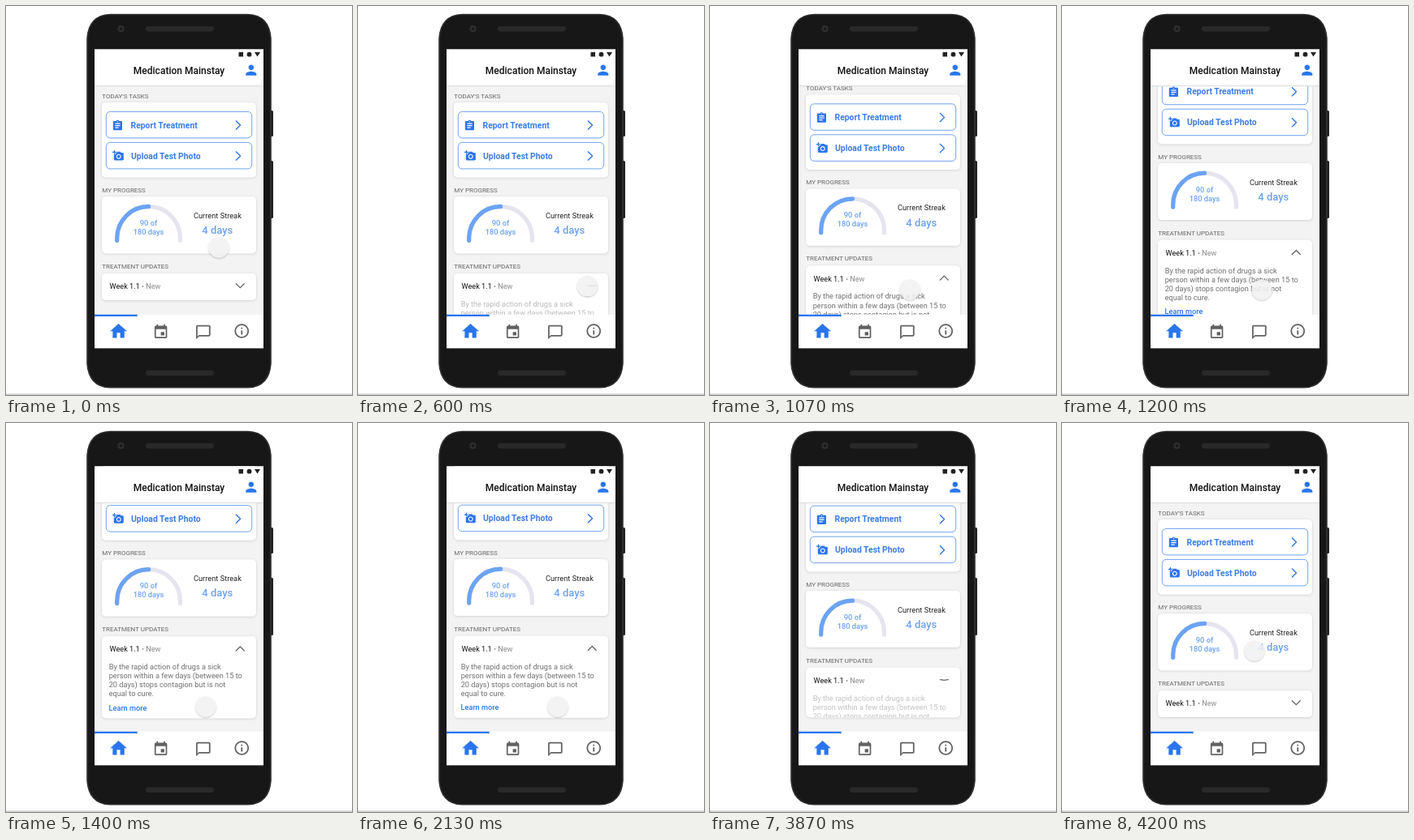
These frames come from a looping animation (426 px wide and 480 px high, 5790 ms). An HTML page:

```html
<!DOCTYPE html>
<html lang="en">
<head>
<meta charset="utf-8">
<style>
html, body { margin: 0; width: 100%; height: 100%; overflow: hidden; background: #fff; }
svg { display: block; width: 100%; height: 100%; font-family: Roboto, sans-serif; }
.label { font-size: 8px; fill: #666; }
.card { fill: #fff; filter: url(#shadow); }
.button { fill: #fff; stroke: #5f97ea; stroke-width: .9; }
.action { font-size: 10.4px; font-weight: 700; fill: #3b7de6; }
.blue { fill: #2a75ee; }
.soft { fill: #6ca3f2; font-weight: 500; }
.gray { fill: #616161; }
.copy { font-size: 9.2px; fill: #707070; }
.line { fill: none; stroke-linecap: round; }
.chevron { fill: none; stroke: #2f76e6; stroke-width: 1.4; }
</style>
</head>
<body>
<svg viewBox="0 0 426 480">
  <defs>
    <filter id="shadow" x="-10%" y="-20%" width="120%" height="150%">
      <feDropShadow dx="0" dy=".6" stdDeviation="1.6" flood-opacity=".17"/>
    </filter>
    <filter id="lift" x="-40%" y="-40%" width="180%" height="180%">
      <feDropShadow dx="0" dy="1" stdDeviation="1" flood-opacity=".3"/>
    </filter>
    <clipPath id="screen"><rect x="109" y="53.600" width="208" height="368.600"/></clipPath>
    <clipPath id="cardClip"><rect id="copyArea" x="118" y="330" width="190" height="33"/></clipPath>
  </defs>

  <rect width="426" height="480" fill="#fff"/>
  <rect y="478.500" width="426" height="1.500" fill="#c9c9c9"/>

  <!-- Phone body -->
  <rect x="324" y="129" width="5" height="32" rx="1.500" fill="#222"/>
  <rect x="324" y="191" width="5" height="71" rx="1.500" fill="#222"/>
  <path d="M128 9.800H298Q324.800 11 326.800 40V441Q324.800 470.600 298 471.600H128Q101.200 470.600 99.200 441V40Q101.200 11 128 9.800Z" fill="#2e2e2e"/>
  <path d="M128 11.300H298Q323 12 325 40V441Q323 469 298 470.100H128Q103 469 101 441V40Q103 12 128 11.300Z" fill="#171717"/>
  <circle cx="141.500" cy="28" r="4" fill="#303030"/>
  <circle cx="141.500" cy="28" r="2" fill="#1b1b1b"/>
  <rect x="172" y="25" width="84" height="6.500" rx="3.200" fill="#292929"/>
  <rect x="172" y="449.500" width="84" height="6.500" rx="3.200" fill="#292929"/>

  <g clip-path="url(#screen)">
    <rect x="109" y="53" width="208" height="370" fill="#f3f3f3"/>

    <g id="page">
      <text class="label" x="118.300" y="113.600">TODAY'S TASKS</text>
      <rect class="card" x="118" y="119" width="190" height="92.500" rx="5"/>
      <rect class="button" x="123.300" y="130.400" width="179.400" height="32.500" rx="5"/>
      <rect class="button" x="123.300" y="168.400" width="179.400" height="32.500" rx="5"/>
      <text class="action" x="153.500" y="150.500">Report Treatment</text>
      <text class="action" x="154" y="188.500">Upload Test Photo</text>
      <path class="chevron" d="M283 141.500l5.500 5.500-5.500 5.500M283 179.500l5.500 5.500-5.500 5.500"/>
      <path class="blue" transform="translate(130 140.200) scale(.62)" d="M19 3h-4.180C14.400 1.840 13.300 1 12 1c-1.300 0-2.400.84-2.820 2H5c-1.100 0-2 .9-2 2v14c0 1.100.9 2 2 2h14c1.100 0 2-.9 2-2V5c0-1.100-.9-2-2-2zm-7 0c.55 0 1 .45 1 1s-.45 1-1 1-1-.45-1-1 .45-1 1-1zm2 14H7v-2h7v2zm3-4H7v-2h10v2zm0-4H7V7h10v2z"/>
      <path class="blue" transform="translate(131 177.300) scale(.6)" d="M3 4V1h2v3h3v2H5v3H3V6H0V4h3zm3 6V7h3V4h7l1.830 2H21c1.100 0 2 .9 2 2v12c0 1.100-.9 2-2 2H5c-1.100 0-2-.9-2-2V10h3zm7 9c2.760 0 5-2.240 5-5s-2.240-5-5-5-5 2.240-5 5 2.240 5 5 5zm-3.200-5c0 1.770 1.430 3.200 3.200 3.200s3.200-1.430 3.200-3.200-1.430-3.200-3.200-3.200-3.200 1.430-3.200 3.200z"/>

      <text class="label" x="118.300" y="230">MY PROGRESS</text>
      <rect class="card" x="118" y="235.300" width="190" height="70" rx="5"/>
      <g class="line" stroke-width="5.200">
        <path stroke="#e5e4ef" d="M136.700 289.300V286.300a38.900 38.900 0 0 1 77.800 0v3"/>
        <path stroke="#6ca3f2" d="M136.700 289.300V286.300a38.900 38.900 0 0 1 38.900-38.900"/>
      </g>
      <g class="soft" font-size="9.300" text-anchor="middle">
        <text x="175.500" y="271">90 of</text>
        <text x="175.500" y="282">180 days</text>
      </g>
      <text x="231" y="262" font-size="9.250" fill="#222">Current Streak</text>
      <text class="soft" x="241.300" y="281.100" font-size="13">4 days</text>

      <text class="label" x="118.300" y="324">TREATMENT UPDATES</text>
      <rect id="updates" class="card" x="118" y="330" width="190" height="33" rx="5"/>
      <text x="127.600" y="349.200" font-size="9.100" fill="#111">Week 1.1 <tspan fill="#8a8a8a">• New</tspan></text>
      <path id="toggle" class="line" stroke="#666" stroke-width="1.300"/>
      <g clip-path="url(#cardClip)">
        <g id="copy" class="copy">
          <text x="126.700" y="371">By the rapid action of drugs a sick</text>
          <text x="126.700" y="382.100">person within a few days (between 15 to</text>
          <text x="126.700" y="393.200">20 days) stops contagion but is not</text>
          <text x="126.700" y="404.200">equal to cure.</text>
          <text class="blue" x="126.500" y="421.600" font-weight="500">Learn more</text>
        </g>
      </g>
    </g>

    <!-- Header -->
    <rect x="109" y="98" width="208" height="1.200" fill="#dedede"/>
    <rect x="109" y="53" width="208" height="45" fill="#fff"/>
    <g fill="#222">
      <rect x="286.500" y="57" width="5.500" height="5.500"/>
      <circle cx="299.500" cy="59.700" r="2.900"/>
      <path d="M306 57h7l-3.500 5.500z"/>
    </g>
    <text x="213" y="84" font-size="12" font-weight="500" text-anchor="middle" fill="#111">Medication Mainstay</text>
    <path class="blue" transform="translate(292 69.300) scale(.82)" d="M12 12c2.210 0 4-1.790 4-4s-1.790-4-4-4-4 1.790-4 4 1.790 4 4 4zm0 2c-2.670 0-8 1.340-8 4v2h16v-2c0-2.660-5.330-4-8-4z"/>

    <!-- Tab bar -->
    <rect x="109" y="380.800" width="208" height="42" fill="#fff"/>
    <rect class="blue" x="109" y="380.700" width="52.700" height="2.300"/>
    <path class="blue" transform="translate(126.200 388.900) scale(1.030)" d="M10 20v-6h4v6h5v-8h3L12 3 2 12h3v8z"/>
    <path class="gray" transform="translate(180.300 391.900) scale(.86)" d="M17 12h-5v5h5v-5zM16 1v2H8V1H6v2H5c-1.110 0-2 .9-2 2v14c0 1.100.89 2 2 2h14c1.100 0 2-.9 2-2V5c0-1.100-.9-2-2-2h-1V1h-2zm3 18H5V8h14v11z"/>
    <path class="gray" transform="translate(232.300 392) scale(.88)" d="M20 2H4c-1.100 0-2 .9-2 2v18l4-4h14c1.100 0 2-.9 2-2V4c0-1.100-.9-2-2-2zm0 14H6l-2 2V4h16v12z"/>
    <path class="gray" transform="translate(279.700 390.500) scale(.88)" d="M11 7h2v2h-2zm0 4h2v6h-2zm1-9C6.480 2 2 6.480 2 12s4.480 10 10 10 10-4.480 10-10S17.520 2 12 2zm0 18c-4.410 0-8-3.590-8-8s3.590-8 8-8 8 3.590 8 8-3.590 8-8 8z"/>

    <g id="pointer"><circle r="12.500" fill="#f2f2f2" filter="url(#lift)"/></g>
  </g>
</svg>
<script>
const LOOP = 5790, SCROLL = 67.2, CARD_GROWTH = 68;
const [page, updates, copyArea, copy, toggle, pointer] =
  ['page', 'updates', 'copyArea', 'copy', 'toggle', 'pointer'].map(id => document.getElementById(id));

const progress = (t, start, end) => Math.min(1, Math.max(0, (t - start) / (end - start)));
const easeOut = p => Math.sin(p * Math.PI / 2);
const easeInOut = p => p * p * (3 - 2 * p);
const mix = (a, b, p) => a + (b - a) * p;

// Each move: start, end, destination x and y
const moves = [
  [0, 330, 287, 345],
  [530, 870, 246, 350],
  [2700, 3200, 242, 292],
  [3600, 4130, 237, 281]
];

function pointerAt(t) {
  let x = 262, y = 298;
  for (const [start, end, toX, toY] of moves) {
    const p = easeInOut(progress(t, start, end));
    x = mix(x, toX, p);
    y = mix(y, toY, p);
  }
  return [x, y];
}

function render(t) {
  const closing = easeInOut(progress(t, 3550, 4130));
  const open = easeInOut(progress(t, 430, 780)) * (1 - closing);
  const scroll = SCROLL * easeOut(progress(t, 1035, 1430)) * (1 - closing);
  const height = 33 + CARD_GROWTH * open;
  const bend = mix(2.5, -2.5, open);
  const [x, y] = pointerAt(t);
  const visible = 1 - progress(t, 3020, 3330) + progress(t, 3930, 4200);

  page.setAttribute('transform', `translate(0 ${-scroll})`);
  updates.setAttribute('height', height);
  copyArea.setAttribute('height', height);
  copy.setAttribute('opacity', open);
  toggle.setAttribute('d', `M283.300 ${345.2 - bend}L288.300 ${345.2 + bend}L293.300 ${345.2 - bend}`);
  pointer.setAttribute('transform', `translate(${x} ${y})`);
  pointer.setAttribute('opacity', 0.87 * visible);
}

const began = performance.now();
function tick() {
  render((performance.now() - began) % LOOP);
  requestAnimationFrame(tick);
}
render(0);
requestAnimationFrame(tick);
</script>
</body>
</html>
```
